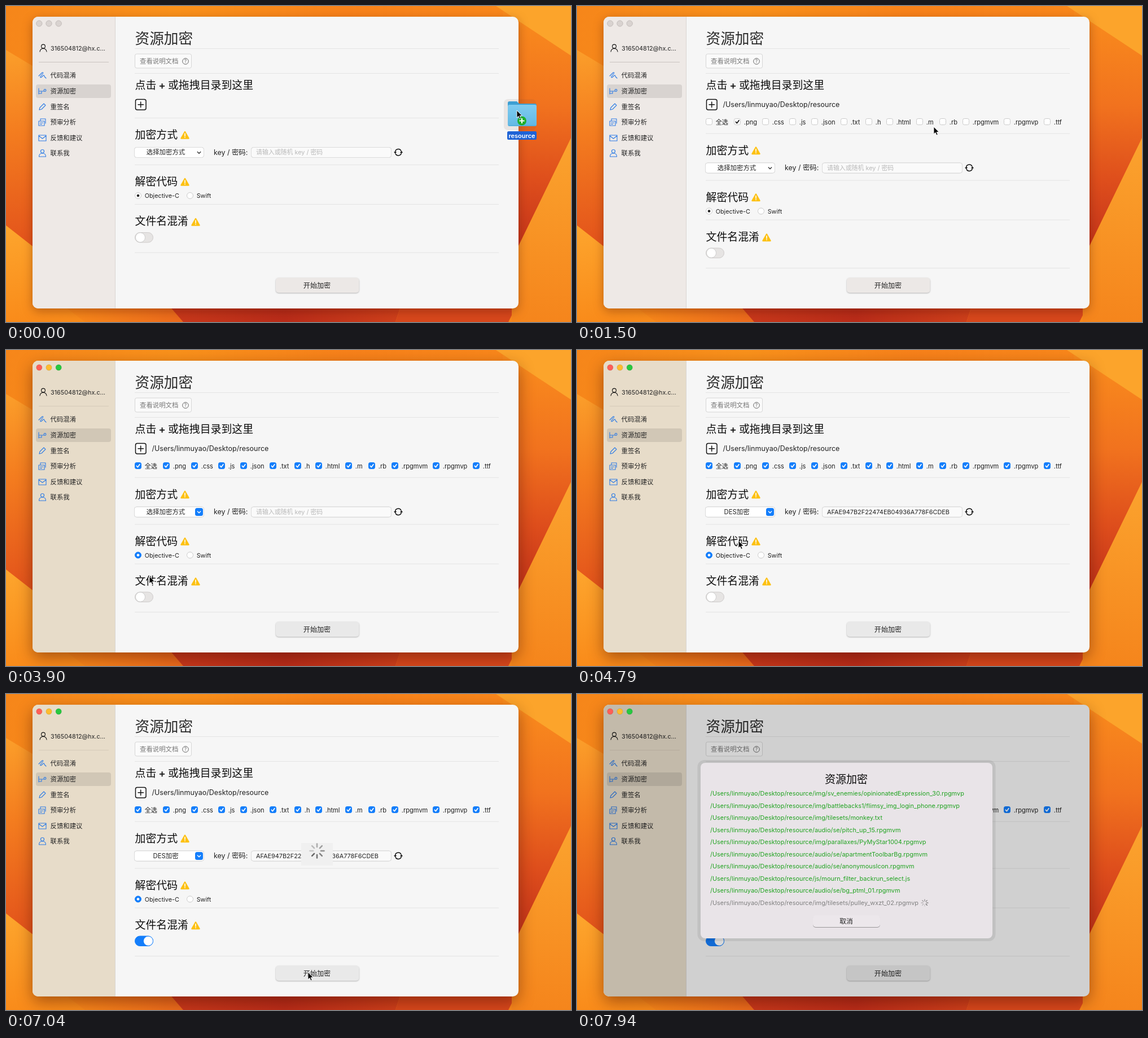
These frames come from a looping animation (1001x560 px, 8 s). An HTML page:

```html
<!DOCTYPE html>
<html lang="zh-CN">
<head>
<meta charset="utf-8">
<title>资源加密</title>
<style>
html, body { margin: 0; width: 100%; height: 100%; overflow: hidden; background: #f98a1c; }
svg { display: block; width: 1001px; height: 560px; }
text { font-family: Inter, "Noto Sans CJK SC", "Noto Sans CJK", sans-serif; fill: #222; white-space: pre; }
.mid { text-anchor: middle; }
.head { fill: #0c0c0c; font-weight: 500; word-spacing: -1px; }
.rule { stroke: #e4e4e4; }
.icon { fill: none; stroke: #2c7be5; stroke-width: 1.1; stroke-linecap: round; stroke-linejoin: round; }
.ink { stroke: #111; }
.bold { stroke-width: 1.5; }
.back { fill: #f6f6f6; filter: drop-shadow(0 5px 9px rgba(70, 10, 0, .34)); }
.active .back { filter: drop-shadow(0 9px 14px rgba(70, 10, 0, .46)); }
.side { fill: #eee9e6; }
.active .side { fill: #e7dcc9; }
.sideline { stroke: #c9c3bf; }
.active .sideline { stroke: #d6cbb9; }
.light { fill: #d9d3d0; stroke: #bdb7b4; stroke-width: .8; }
.active .light { fill: var(--c); stroke: #0002; }
.field { fill: #fff; stroke: #dcdcdc; filter: drop-shadow(0 .7px .6px #0003); }
.input { fill: #fafafa; }
.box { fill: #fff; stroke: #cbcbcb; }
.tick { fill: none; stroke: #111; stroke-width: 1.7; stroke-linecap: round; stroke-linejoin: round; visibility: hidden; }
.on .tick { visibility: visible; }
.active .on .box { fill: #147efb; stroke: #147efb; }
.active .on .tick { stroke: #fff; }
.dot { fill: #222; }
.active .on .dot { fill: #fff; }
.arrow { fill: none; }
.active .arrow { fill: #147efb; }
.chevron { fill: none; stroke: #333; stroke-width: 1.4; stroke-linecap: round; stroke-linejoin: round; }
.active .chevron { stroke: #fff; }
.go { fill: #ece8e6; filter: drop-shadow(0 1px .8px #0004); }
.active .go { fill: #e9e9e9; }
.track { fill: #e6e4e3; stroke: #cfcccb; }
.on .track { fill: #147efb; stroke: #147efb; }
.knob { fill: #fff; stroke: #c4c4c4; stroke-width: .8; }
.on .knob { transform: translateX(14px); stroke: #147efb; }
.placeholder { fill: #b9b9b9; }
</style>
</head>
<body>
<svg id="stage" viewBox="0 0 1001 560">
  <defs>
    <linearGradient id="top"><stop stop-color="#f6861a"/><stop offset=".3" stop-color="#fa921b"/><stop offset=".6" stop-color="#f8821a"/><stop offset="1" stop-color="#fa8a1b"/></linearGradient>
    <linearGradient id="left" x2="0" y2="1"><stop stop-color="#fb9e2a"/><stop offset=".4" stop-color="#f47d1f"/><stop offset="1" stop-color="#e2511b"/></linearGradient>
    <linearGradient id="leftLow" x2="0" y2="1"><stop stop-color="#fda52d"/><stop offset="1" stop-color="#f98b1a"/></linearGradient>
    <linearGradient id="floor"><stop stop-color="#f98b1a"/><stop offset="1" stop-color="#ec6a1c"/></linearGradient>
    <linearGradient id="deep"><stop stop-color="#c9391b"/><stop offset=".5" stop-color="#b92c19"/><stop offset="1" stop-color="#cf401b"/></linearGradient>
    <linearGradient id="right" x2="0" y2="1"><stop stop-color="#fa8e1d"/><stop offset=".4" stop-color="#f1721e"/><stop offset=".7" stop-color="#de4e1c"/><stop offset="1" stop-color="#c1301a"/></linearGradient>
    <linearGradient id="rightLow" x2="0" y2="1"><stop stop-color="#fba32e"/><stop offset="1" stop-color="#f5851c"/></linearGradient>
    <linearGradient id="folder" x2="0" y2="1"><stop stop-color="#7fcbf0"/><stop offset="1" stop-color="#62b8e4"/></linearGradient>
  </defs>

  <g id="wallpaper">
    <path fill="url(#top)" d="M0 0H1001V560H0z"/>
    <path fill="url(#left)" d="M0 78L60 114V436L0 389z"/>
    <path fill="url(#leftLow)" d="M0 389L60 436L150 560H0z"/>
    <path fill="url(#floor)" d="M100 530H300L314 560H140z"/>
    <path fill="url(#deep)" d="M288 530H700L690 560H314z"/>
    <path fill="#d8481c" d="M700 530H905L890 560H690z"/>
    <path fill="url(#right)" d="M880 0H1001V234L900 442z"/>
    <path fill="#fca42b" d="M868 0H1001V88z"/>
    <path fill="url(#rightLow)" d="M1001 234L896 450V560H1001z"/>
  </g>

  <rect class="back" x="47" y="19" width="861" height="517" rx="10"/>
  <path class="side" d="M193 19H57a10 10 0 0 0-10 10V526a10 10 0 0 0 10 10H193z"/>
  <path stroke="#d9d5d2" d="M193.5 19V536"/>
  <path class="sideline" d="M58 99.5H182"/>
  <rect x="53" y="139" width="133" height="24" rx="4" fill="#00000018"/>
  <g class="icon">
    <g class="ink"><circle cx="66" cy="71.5" r="3.4"/><path d="M60 81c.5-4 3-5.500 6-5.500s5.500 1.500 6 5.500"/></g>
    <path d="M58 124l6-6q3-1 1 2l-4 5q-1 3 2 1l3-3q2-1 2 2l3 3"/>
    <path d="M58 146v10M58 151h9M58 155h5v-3"/><circle cx="69" cy="149.500" r="1.900"/>
    <path d="M59 184l1-4 7-7 3 3-7 7z"/>
    <path d="M61 204v-4h9v8M58 204h10v8H58zM60.500 207h5M60.500 209.500h3"/>
    <path d="M58 229h13v10H58zM58 230l6.500 5 6.500-5"/>
    <circle cx="64.500" cy="257.500" r="3"/><path d="M58.500 267c0-4 2.500-6 6-6s6 2 6 6z"/>
  </g>
  <g id="labels"></g>

  <rect x="228.5" y="85" width="100" height="25" rx="3" fill="#fafafa" stroke="#d6d6d6"/>
  <circle cx="318" cy="98" r="5.3" fill="none" stroke="#6a6a6a"/>
  <g class="icon ink bold">
    <rect x="229.500" y="165.500" width="18.500" height="18.500" rx="3" fill="#fff"/><path d="M234 174.700h9.500M238.700 170v9.500"/>
  </g>
  <g id="picked"></g>

  <g id="lower">
    <path class="rule" d="M228 198.500H873M228 281.500H873M228 351.500H873M228 437H873"/>
    <rect class="field" x="227.5" y="250.5" width="123" height="18" rx="4"/>
    <rect class="arrow" x="335" y="252.500" width="14" height="14" rx="3.500"/>
    <path class="chevron" d="M339.300 258.500l2.700 2.700 2.700-2.700"/>
    <rect class="field input" x="434.5" y="250.500" width="248" height="18" rx="4"/>
    <path class="icon ink bold" d="M689.500 259a5.500 5.500 0 0 1 10.300-2.600M700.500 259.500a5.500 5.500 0 0 1-10.300 2.600"/>
    <path fill="#111" d="M687 258.500h5.200l-2.600 3.300zM698 260h5.200l-2.600-3.300z"/>
    <g class="on"><circle class="box" cx="234" cy="336" r="5.500"/><circle class="dot" cx="234" cy="336" r="2.300"/></g>
    <circle class="box" cx="326" cy="336" r="5.500"/>
    <g id="toggle"><rect class="track" x="228.500" y="401.500" width="32" height="17.500" rx="8.700"/><circle class="knob" cx="238" cy="410.200" r="8.500"/></g>
    <g id="forms"></g>
  </g>

  <rect class="go" x="478" y="481.500" width="147.500" height="26.500" rx="5"/>
  <text class="mid" x="551" y="500" font-size="12.100" font-weight="500">开始加密</text>

  <g id="menu"></g>
  <g id="hud"><rect x="523" y="264" width="56" height="40" fill="#f0f0f0"/></g>

  <rect id="dim" x="47" y="19" width="861" height="517" rx="10" fill="#000"/>
  <g id="lights"></g>
  <g id="sheet">
    <rect x="213.500" y="117" width="528" height="321" rx="12" fill="#00000012"/>
    <rect x="219" y="122" width="517" height="311" rx="8" fill="#e9e4e8"/>
    <text class="mid head" x="477" y="158" font-size="19">资源加密</text>
    <rect x="418" y="392" width="119" height="21" rx="5" fill="#ece7eb" filter="drop-shadow(0 1px .7px #0005)"/>
    <text class="mid" x="477" y="406.500" font-size="11.800">取消</text>
    <g id="rows"></g>
    <g id="busy"></g>
  </g>

  <g id="drag">
    <rect x="-23" y="-20" width="57" height="55" rx="7" fill="#785040" opacity=".1"/>
    <path fill="#3d9fd3" d="M-16-13q0-3 3-3h13l4 4h28q3 0 3 3v10h-51z"/>
    <rect x="-16" y="-10" width="51" height="38" rx="3" fill="url(#folder)"/>
    <path stroke="#4da9d8" d="M-15 27H34"/>
    <rect x="-17" y="37" width="52" height="15" rx="2.500" fill="#1f63d6"/>
    <text class="mid" x="9" y="48.500" font-size="11" font-weight="600" style="fill:#fff">resource</text>
    <circle cx="9" cy="18.500" r="8" fill="#1fae2c"/>
    <path stroke="#fff" stroke-width="2" d="M4.500 18.500h9M9 14v9"/>
  </g>
  <path id="cursor" fill="#000" stroke="#fff" stroke-width=".9" d="M0 0V13L3 10.300 5 15 7.200 14 5.200 9.500H9.300z"/>
</svg>

<script>
const $ = id => document.getElementById(id);
const add = (id, ...parts) => $(id).insertAdjacentHTML('beforeend', parts.join(''));
const text = (x, y, size, str, attrs = '') => `<text x="${x}" y="${y}" font-size="${size}" ${attrs}>${str}</text>`;
const heading = (y, str) => text(228.5, y, 18.9, str, 'class="head"');
const show = (id, on) => { $(id).style.display = on ? '' : 'none'; };

const home = '/Users/linmuyao/Desktop/resource';
const files = [
  'img/sv_enemies/opinionatedExpression_30.rpgmvp', 'img/battlebacks1/flimsy_img_login_phone.rpgmvp',
  'img/tilesets/monkey.txt', 'audio/se/pitch_up_15.rpgmvm', 'img/parallaxes/PyMyStar1004.rpgmvp',
  'audio/se/apartmentToolbarBg.rpgmvm', 'audio/se/anonymousIcon.rpgmvm', 'js/mourn_filter_backrun_select.js',
  'audio/se/bg_ptml_01.rpgmvm', 'img/tilesets/pulley_wxzt_02.rpgmvp'
];
const types = { '全选': 234, '.png': 284, '.css': 334, '.js': 382, '.json': 421, '.txt': 473, '.h': 517,
  '.html': 554, '.m': 607, '.rb': 648, '.rpgmvm': 689, '.rpgmvp': 762, '.ttf': 833 };

const warning = (x, y) => `<path d="M${x} ${y - 6}l6.5 11.500h-13z" fill="#fdc113" stroke="#fdc113" stroke-width="2.5" stroke-linejoin="round"/>
  <path d="M${x} ${y - 3}v4.500M${x} ${y + 3.6}v.4" stroke="#fff" stroke-width="1.6" stroke-linecap="round"/>`;
const checkbox = ([label, x]) => `<g class="check"><rect class="box" x="${x - 5.5}" y="199.5" width="11" height="11" rx="2.8"/>
  <path class="tick" d="M${x - 2.7} 205.300l2 2.400 3.600-5"/>${text(x + 11.7, 209.5, 11.1, label)}</g>`;
const spinner = (inner, outer, width) => Array.from({ length: 8 }, (_, i) =>
  `<path d="M0 ${-inner}V${-outer}" stroke="#555" stroke-width="${width}" stroke-linecap="round" opacity="${.25 + i * .09}" transform="rotate(${i * 45})"/>`).join('');

add('labels',
  text(79, 79, 10.8, '316504812@hx.c...'),
  ...['代码混淆', '资源加密', '重签名', '预审分析', '反馈和建议', '联系我'].map((s, i) => text(78.5, 127.4 + i * 27.6, 11.4, s)),
  text(228.5, 66.5, 25.7, '资源加密', 'style="fill:#2b2b2b"'),
  '<path class="rule" d="M228 75.5H873M228 119.5H873"/>',
  heading(147, '点击 + 或拖拽目录到这里'));
$('picked').insertAdjacentHTML('beforebegin',
  text(237, 102, 11.4, '查看说明文档', 'style="fill:#777"') + text(318, 101.2, 8.5, '?', 'class="mid" style="fill:#666"'));
add('picked', text(258.5, 178.5, 12.5, home), ...Object.entries(types).map(checkbox));
add('forms',
  heading(235, '加密方式'), warning(317, 229),
  text(283, 263.3, 11.4, '选择加密方式', 'id="method" class="mid"'),
  text(368, 263.8, 12.4, 'key / 密码:'),
  text(443, 263.3, 10.9, '', 'id="key"'),
  heading(318, '解密代码'), warning(317, 312),
  text(245.7, 340.2, 10.8, 'Objective-C'), text(337.7, 340.2, 10.8, 'Swift'),
  heading(388, '文件名混淆'), warning(336, 383));
add('menu',
  '<rect x="226" y="280" width="130" height="142" rx="6" fill="#f1f1f1" stroke="#cfcfcf" filter="drop-shadow(0 2px 3px #0004)"/>',
  '<rect id="hover" x="231" width="120" height="22" rx="4" fill="#147efb"/>',
  ...['选择加密方式', 'AES加密', 'DES加密', '3DES加密', 'RC4加密', 'XOR加密'].map((s, i) =>
    text(249, 300 + i * 22, 11.4, s, 'class="item"')));
add('lights', ...['#fe5f57', '#febc2e', '#28c840'].map((c, i) =>
  `<circle class="light" style="--c:${c}" cx="${58.8 + i * 17.2}" cy="31" r="5.2"/>`));
add('rows', ...files.map((f, i) => text(236, 180 + i * 21.56, 10.95, `${home}/${f}`, 'class="row"')));
add('hud', `<g transform="translate(551 278)"><g id="spin">${spinner(7, 12.5, 2.6)}</g></g>`);
add('busy', `<g id="spinSmall">${spinner(3, 6, 1.2)}</g>`);

const checks = [...document.querySelectorAll('.check')];
const items = [...document.querySelectorAll('.item')];
const rows = [...document.querySelectorAll('.row')];

// Pointer waypoints: time, x, y
const route = [
  [0, 905, 185], [300, 852, 178], [1050, 662, 184], [1350, 662, 184], [1500, 632, 214], [1650, 632, 214],
  [2550, 230, 206], [2700, 229, 206], [2850, 229, 206], [3150, 240, 354], [3300, 240, 354], [3600, 251, 412],
  [3900, 254, 401], [4190, 300, 287], [4340, 300, 289], [4490, 288, 335], [4640, 288, 335], [4790, 286, 338],
  [5540, 250, 438], [5690, 248, 440], [5840, 246, 440], [6140, 246, 440], [6890, 530, 505], [7040, 535, 493],
  [7190, 535, 493], [7340, 520, 541], [8000, 520, 541]
];
function pointer(t) {
  const i = route.findIndex(p => p[0] > t) - 1;
  const [t0, x0, y0] = route[i], [t1, x1, y1] = route[i + 1];
  const k = (t - t0) / (t1 - t0);
  return [x0 + (x1 - x0) * k, y0 + (y1 - y0) * k];
}

function tick(t) {
  const start = t < 4040 ? 0 : 4040;
  return start + Math.floor((t - start) / 150) * 150;
}

function render(t) {
  const dropped = t >= 1350, chosen = t >= 4790, [x, y] = pointer(t);
  $('stage').classList.toggle('active', t >= 2550);
  show('picked', dropped);
  $('lower').setAttribute('transform', `translate(0 ${dropped ? 27.5 : 0})`);
  checks.forEach((c, i) => c.classList.toggle('on', i === 1 || t >= 2850));

  $('method').textContent = chosen ? 'DES加密' : '选择加密方式';
  $('key').textContent = chosen ? 'AFAE947B2F22474EB04936A778F6CDEB' : '请输入或随机 key / 密码';
  $('key').classList.toggle('placeholder', !chosen);
  $('toggle').classList.toggle('on', t >= 6140);

  const hover = t >= 4490 ? 2 : 0;
  show('menu', t >= 4340 && !chosen);
  $('hover').setAttribute('y', 285 + hover * 22);
  items.forEach((m, i) => { m.style.fill = i === hover ? '#fff' : ''; });

  const turn = `rotate(${Math.floor(t / 150) * 45})`;
  show('hud', t >= 6890 && t < 7190);
  $('spin').setAttribute('transform', turn);
  $('spinSmall').setAttribute('transform', turn);

  const open = t < 7190 ? 0 : t < 7340 ? .6 : 1;
  $('dim').setAttribute('opacity', open * .158);
  show('sheet', open);
  $('sheet').setAttribute('opacity', open);
  $('sheet').setAttribute('transform', `translate(477 277) scale(${.75 + open * .25}) translate(-477 -277)`);

  const count = t >= 7940 ? 10 : t >= 7790 ? 5 : t >= 7490 ? 1 : 0;
  rows.forEach((r, i) => {
    r.style.display = i < count ? '' : 'none';
    r.style.fill = i === count - 1 ? '#808080' : '#21a321';
  });
  show('busy', count);
  if (count) {
    const end = 236 + rows[count - 1].getComputedTextLength();
    $('busy').setAttribute('transform', `translate(${end + 11} ${176 + (count - 1) * 21.56})`);
  }

  show('drag', !dropped);
  show('cursor', t < 7490);
  for (const id of ['drag', 'cursor']) $(id).setAttribute('transform', `translate(${x} ${y})`);
}

const began = performance.now();
let last = -1;
function loop() {
  const now = tick((performance.now() - began) % 8000);
  if (now !== last) render(last = now);
  requestAnimationFrame(loop);
}
loop();
</script>
</body>
</html>
```
